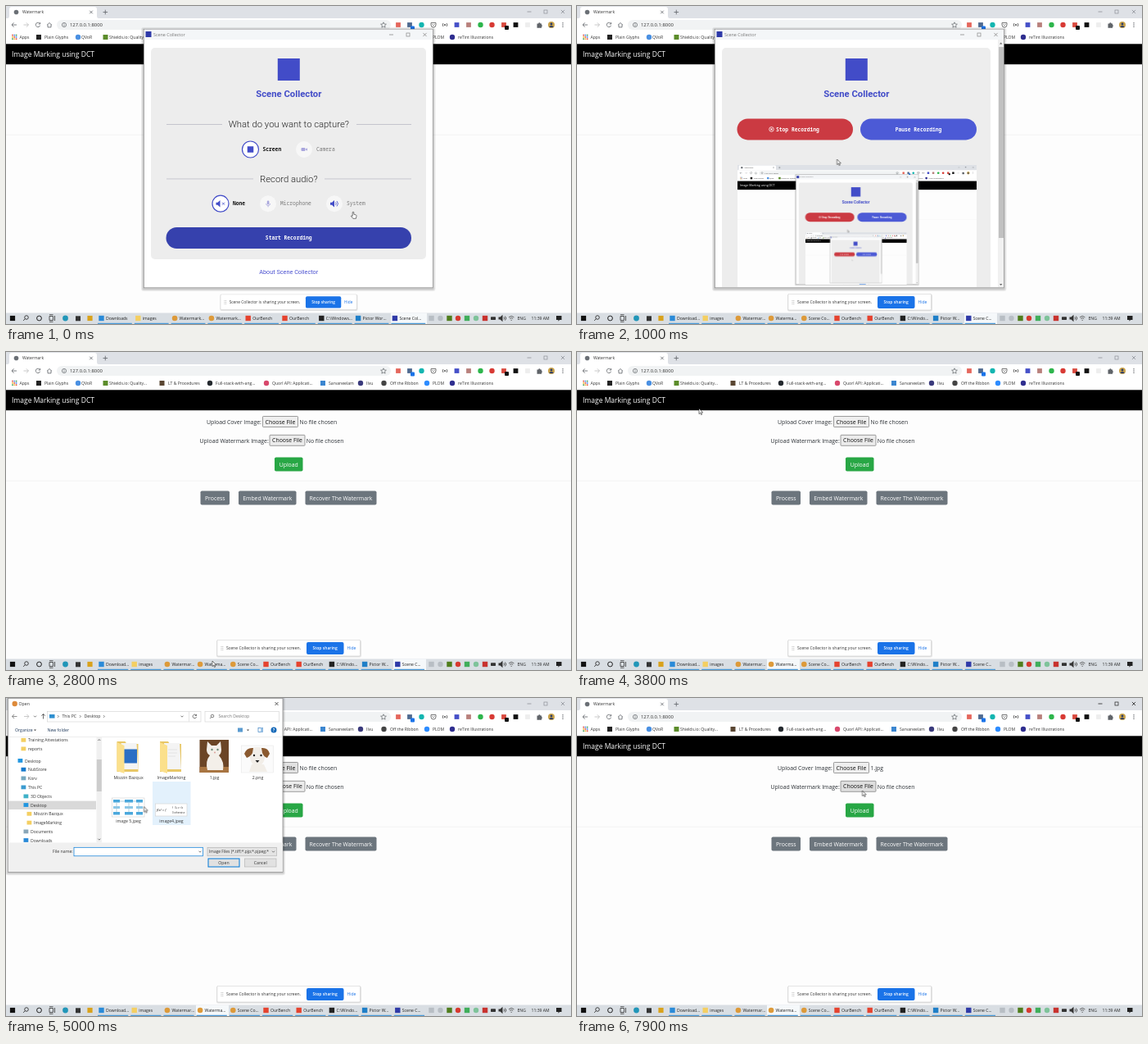
An HTML page for the animation above (8 s loop, 690 px wide and 388 px high).

```html
<!DOCTYPE html>
<html lang="en">
<head>
<meta charset="utf-8">
<title>Watermark</title>
<style>
html, body { margin: 0; width: 100%; height: 100%; overflow: hidden; background: #fdfdfd; }
body > svg { display: block; width: 690px; height: 388px; }
text { font-family: 'Open Sans', sans-serif; white-space: pre; }
.rb { font-family: Roboto, sans-serif; }
.mono { font-family: 'Noto Sans Mono', monospace; }
.mid { text-anchor: middle; }
.b { font-weight: 700; }

.setup, .rec, .bar1, .bar2, .active, .dialog, .closed, .picked, .named, .hand, .arrow,
.hover1, .hover2, .over4, .over1, .mark { animation: 8s step-end infinite; }
.setup { animation-name: setup; }
.rec { animation-name: rec; }
.bar1, .hand { animation-name: early; }
.bar2, .arrow { animation-name: late; }
.mark { animation-name: mark; }
.dialog { animation-name: dialog; }
.hover1 { animation-name: hover1; }
.hover2 { animation-name: hover2; }
.over4 { animation-name: over4; }
.over1 { animation-name: over1; }
.named { animation-name: named; }
.closed { animation-name: closed; }
.picked, .active { animation-name: picked; }
@keyframes setup { 0% { visibility: visible } 3.75%, 100% { visibility: hidden } }
@keyframes rec { 0% { visibility: hidden } 3.75%, 100% { visibility: visible } }
@keyframes early { 0% { visibility: visible } 4.375%, 100% { visibility: hidden } }
@keyframes late { 0% { visibility: hidden } 4.375%, 100% { visibility: visible } }
@keyframes mark { 0% { transform: translateX(272px) } 12.5% { transform: translateX(473px) } 36.25%, 100% { transform: translateX(232px) } }
@keyframes dialog { 0% { visibility: hidden } 52.5% { visibility: visible } 81.25%, 100% { visibility: hidden } }
@keyframes hover1 { 0% { fill: #efefef } 50% { fill: #e2e2e2 } 81.25%, 100% { fill: #efefef } }
@keyframes hover2 { 0% { fill: #ececec } 97.5%, 100% { fill: #dedede } }
@keyframes over4 { 0% { visibility: hidden } 60% { visibility: visible } 63.75%, 100% { visibility: hidden } }
@keyframes over1 { 0% { visibility: hidden } 70% { visibility: visible } 81.25%, 100% { visibility: hidden } }
@keyframes named { 0% { visibility: hidden } 73.75% { visibility: visible } 81.25%, 100% { visibility: hidden } }
@keyframes closed { 0% { visibility: visible } 81.25%, 100% { visibility: hidden } }
@keyframes picked { 0% { visibility: hidden } 81.25%, 100% { visibility: visible } }

.win { transform-origin: 493px 381px; animation: win 8s infinite; }
.stop { animation: stop 8s linear infinite; }
.pause { animation: pause 8s linear infinite; }
.view { animation: view 8s linear infinite; }
.share { transform-origin: 345px 361px; animation: share 8s infinite; }
.cur { animation: cur 8s ease-in-out infinite; }
@keyframes win { 0%, 16.25% { opacity: 1; transform: none } 18.75%, 100% { opacity: 0; transform: scale(.7) } }
@keyframes stop { 0%, 3.75% { opacity: 0; transform: translateY(-10px) } 7.25%, 100% { opacity: 1; transform: none } }
@keyframes pause { 0%, 5% { opacity: 0; transform: translateY(-10px) } 8.125%, 100% { opacity: 1; transform: none } }
@keyframes view { 0%, 3.75% { opacity: 0 } 8.75%, 100% { opacity: 1 } }
@keyframes share { 0%, 2% { transform: scale(.952) } 5%, 100% { transform: none } }
@keyframes cur {
  0%, 1.25% { transform: translate(424px, 251px) }
  3.75% { transform: translate(392px, 276px) }
  6.25%, 12.5% { transform: translate(317.5px, 187px) }
  16%, 23.75% { transform: translate(471.5px, 32px) }
  31.25%, 36.25% { transform: translate(252px, 377px) }
  42.5%, 45% { transform: translate(172px, 112px) }
  47.5% { transform: translate(149px, 69px) }
  51.25%, 56.25% { transform: translate(332px, 87px) }
  60.5% { transform: translate(206px, 124px) }
  62.5% { transform: translate(168.5px, 132.5px) }
  66.25%, 67.5% { transform: translate(166px, 132px) }
  73%, 77.5% { transform: translate(262px, 88.5px) }
  80.6%, 85% { transform: translate(268px, 199px) }
  95%, 100% { transform: translate(348.5px, 113px) }
}
/* the live preview runs a little late */
.view * { animation-delay: 80ms; animation-fill-mode: backwards; }
</style>
</head>
<body>
<script>
const BLUE = '#424cc8', INK = '#333', GREY = '#5f6368';
const R = (x, y, w, h, fill, more = '') => `<rect x="${x}" y="${y}" width="${w}" height="${h}" fill="${fill}" ${more}/>`;
const C = (x, y, r, fill, more = '') => `<circle cx="${x}" cy="${y}" r="${r}" fill="${fill}" ${more}/>`;
const P = (d, stroke = GREY, more = '') => `<path d="${d}" fill="none" stroke="${stroke}" stroke-width=".8" ${more}/>`;
const F = (d, fill, more = '') => `<path d="${d}" fill="${fill}" ${more}/>`;
const T = (x, y, s, size = 5.1, fill = INK, more = '') => `<text x="${x}" y="${y}" font-size="${size}" fill="${fill}" ${more}>${s}</text>`;
const G = (cls, ...parts) => `<g class="${cls}">${parts.join('')}</g>`;
const box = (x, y, s, fill) => R(x - s / 2, y - s / 2, s, s, fill);
const cross = (x, y, r, c) => P(`M${x - r} ${y - r}l${2 * r} ${2 * r}m0 ${-2 * r}l${-2 * r} ${2 * r}`, c);
const controls = (xs, y, c) => P(`M${xs[0] - 2.5} ${y}h5`, c) + R(xs[1] - 2, y - 2, 4, 4, 'none', `stroke="${c}" stroke-width=".7"`) + cross(xs[2], y, 2.1, c);
const search = (x, y, r, c) => C(x, y, r, 'none', `stroke="${c}" stroke-width=".8"`) + P(`M${x - r * .7} ${y + r * .7}l${-r} ${r}`, c);
const back = (x, y, c, dir = 1) => P(`M${x + 3 * dir} ${y}h${-6 * dir}m${2.6 * dir} -2.6l${-2.6 * dir} 2.6l${2.6 * dir} 2.6`, c);
const shadow = (x, y, w, h) => [1, 2, 3].map(d => R(x - d, y - d + 1, w + 2 * d, h + 2 * d, '#000', `opacity=".07" rx="${d}"`)).join('');

function browser() {
  const marks = [
    [40, 47, 'Plain Glyphs', '#222', 0], [88, 92, 'QVoR', '#4a90e2', 1],
    [121.5, 126, 'Shields.io: Quality...', '#5b8c2a', 0], [190.5, 198, 'LT &amp; Procedures', '#5a4632', 0],
    [249, 256, 'Full-stack-with-ang...', '#24292e', 1], [318, 325, 'Quorl API: Applicati...', '#d8486c', 1],
    [387, 394, 'Sarvaneelam', '#3b86d0', 0], [433, 440, 'Ilvu', '#3a3a7c', 1],
    [461.5, 469, 'Off the Ribbon', '#444', 1], [514, 521, 'PLOM', '#2d8cff', 1],
    [545, 552, 'reTint Illustrations', '#2f2e8f', 1]];
  const tools = [[479, '#e5675c', 0], [493, '#4f6a90', 0], [507.5, '#12b5b0', 1], [550.5, '#4650c8', 0],
    [565, '#b8807c', 0], [579.5, '#2db54b', 1], [593.5, '#d83a34', 1], [608, '#d94a3f', 0], [622.5, '#111', 0], [637, '#eee', 0]];
  return R(0, 0, 690, 15, '#dee1e6') +
    F('M2 15q2 0 2-3v-8q0-3 3-3h101q3 0 3 3v8q0 3 2 3z', '#fff') +
    C(12.5, 7.5, 2.8, '#6b7076') + T(20, 9.4, 'Watermark', 5) + cross(104, 7.5, 1.8, GREY) +
    P('M118.500 7.500h5.600m-2.800-2.800v5.600', GREY) +
    G('closed', controls([639, 659, 680], 7, '#8d9197')) + G('active', controls([639, 659, 680], 7, '#222')) +
    R(0, 15, 690, 31.500, '#fff') + R(62, 17, 408, 12, '#f1f3f4', 'rx="6"') +
    back(10, 23, GREY) + back(24.5, 23, '#bbb', -1) +
    P('M41.300 21.500a2.700 2.700 0 1 0 .3 2.200M41.700 20v2h-2', GREY) +
    P('M50 23.300l3-2.800l3 2.800M51 22.700v3.200h4v-3.200', GREY) +
    C(71, 23, 2.6, 'none', `stroke="${GREY}" stroke-width=".7"`) + P('M71 22.600v1.800M71 21.300v.6', GREY) +
    T(78, 25.1, '127.0.0.1:8000', 5.9) +
    F('M461 19.800l1 2.200 2.400.2-1.800 1.600.5 2.400-2.100-1.300-2.100 1.300.5-2.400-1.800-1.600 2.400-.2z', 'none', `stroke="${GREY}" stroke-width=".7"`) +
    tools.map(([x, c, round]) => round ? C(x, 23, 3.2, c) : box(x, 23, 5.8, c)).join('') +
    R(494, 24.5, 5, 5, '#1a73e8', 'rx="1"') + R(609, 24, 5, 5, '#111', 'rx="1"') +
    P('M519 20.500h6v2.500a3 3 0 0 1-6 0zM520.500 22.300l1.500 1.500 1.500-1.500', '#555') +
    C(536, 23, 1, '#444') + P('M534 21a3 3 0 0 0 0 4M538 21a3 3 0 0 1 0 4', '#444') +
    F('M648.500 21.500h1.700a1.200 1.200 0 0 1 2.400 0h1.500v1.600a1.200 1.200 0 0 1 0 2.200v1.400h-5.600z', GREY) +
    C(666, 23, 4, '#c9a24a') + C(666, 22, 1.4, '#2c3c66') + F('M663.300 26a2.800 2.800 0 0 1 5.400 0z', '#2c3c66') +
    [20.7, 23, 25.3].map(y => C(680, y, .7, GREY)).join('') +
    [0, 1, 2, 3, 4, 5, 6, 7, 8].map(i => box(8 + i % 3 * 2.3, 35.6 + (i / 3 | 0) * 2.3, 1.6, ['#e2493c', '#f0b428', '#3c9a55', '#4285f4'][i * 3 % 4])).join('') +
    T(16.5, 39.8, 'Apps') +
    marks.map(([x, tx, s, c, round]) => (round ? C(x, 38, 3.2, c) : box(x, 38, 6, c)) + T(tx, 39.8, s)).join('');
}

function site() {
  const btn = (x, y, w, s, c) => R(x, y, w, 17, c, 'rx="1.8"') + T(x + w / 2, y + 11.2, s, 6.9, '#fff', 'class="mid"');
  const pick = (x, y, cls) => R(x, y, 43, 13, '#efefef', `class="${cls}" stroke="#767676" stroke-width=".7" rx=".8"`) +
    T(x + 21.5, y + 9.1, 'Choose File', 6.9, '#111', 'class="mid"');
  return R(0, 46, 690, 342, '#fdfdfd') + R(0, 46.3, 690, 24.9, '#000') + T(7, 62, 'Image Marking using DCT', 8.5, '#fff') +
    T(245, 87.7, 'Upload Cover Image:', 6.9, '#2b3035') + pick(313.5, 78.5, 'hover1') +
    G('closed', T(358.5, 87.7, 'No file chosen', 6.9, '#2b3035')) + G('picked', T(358.5, 87.7, '1.jpg', 6.9, '#2b3035')) +
    T(236.5, 110.5, 'Upload Watermark Image:', 6.9, '#2b3035') + pick(322, 101.3, 'hover2') + T(366.7, 110.5, 'No file chosen', 6.9, '#2b3035') +
    btn(328, 128.5, 34.5, 'Upload', '#28a745') + R(0, 156.8, 690, .6, '#e9e9e9') +
    btn(237.5, 169.5, 35.5, 'Process', '#6c757d') + btn(284, 169.5, 70.5, 'Embed Watermark', '#6c757d') +
    btn(365.5, 169.5, 87, 'Recover The Watermark', '#6c757d');
}

const speaker = (x, y, c, tail) => F(`M${x - 4.5} ${y - 1.5}h2l3-2.700v8.400l-3-2.700h-2z`, c) + P(tail, c);

function setup() {
  const title = (y, s, a, b) => R(196, y, a - 196, .7, '#b4b4c0') + R(b, y, 495 - b, .7, '#b4b4c0') +
    T(345.3, y + 4, s, 11.3, '#222', 'class="rb mid" font-weight="300"');
  const opt = (x, y, s, on) => C(x, y, 10, on ? '#fff' : '#f7f7f7', on ? `stroke="${BLUE}" stroke-width="1.2"` : '') +
    T(x + 15, y + 2, s, 6.3, on ? '#111' : '#777', `class="mono${on ? ' b' : ''}"`);
  return G('setup', R(177, 51, 336, 258, '#ededed', 'rx="5"'), box(345.3, 77.5, 27, BLUE),
    T(345.3, 111.3, 'Scene Collector', 11.3, BLUE, 'class="rb b mid"'),
    title(144, 'What do you want to capture?', 264, 428), title(210.6, 'Record audio?', 302, 389),
    opt(298.5, 175, 'Screen', 1), box(298.5, 175, 7.5, BLUE),
    opt(364, 175, 'Camera'), R(360.5, 173, 5, 4, '#a9a6dd', 'rx="1"'), F('M365.500 175l2.500-1.800v3.600z', '#a9a6dd'),
    opt(262, 241.2, 'None', 1), speaker(261, 241.2, BLUE, 'M264 239.700l3 3m0-3l-3 3'),
    opt(320, 241.2, 'Microphone'), R(318.8, 237.5, 2.6, 4.8, '#a9a6dd', 'rx="1.3"'), P('M317.600 241a2.500 2.500 0 0 0 5 0M320.100 243.500v1.800', '#a9a6dd'),
    opt(401, 241.2, 'System'), speaker(400.5, 241.2, BLUE, 'M402.500 239.500q1.500 1.700 0 3.400M404 238q3 3.200 0 6.400'),
    R(195.5, 270, 299.5, 26, '#3641ad', 'rx="13"'), T(345.2, 285.2, 'Start Recording', 6.3, '#fff', 'class="mono b mid"'),
    T(345.2, 326.5, 'About Scene Collector', 7.3, '#4a50d0', 'class="rb mid"'));
}

function recording(depth) {
  return G('rec', '<svg x="169" y="41" width="345" height="302" viewBox="169 41 345 302">',
    R(177, 51, 328, 300, '#ededed', 'rx="5"'), box(341.3, 77.5, 27, BLUE),
    T(341.3, 111.3, 'Scene Collector', 11.3, BLUE, 'class="rb b mid"'),
    G('stop', R(195.5, 137.4, 141.5, 26, '#cb3a42', 'rx="13"'), C(237.5, 150.4, 2.8, 'none', 'stroke="#fff" stroke-width=".8"'), box(237.5, 150.4, 2, '#fff'),
      T(243, 152.6, 'Stop Recording', 6.3, '#fff', 'class="mono b"')),
    G('pause', R(346, 137.4, 142, 26, '#4c5ad6', 'rx="13"'), T(417, 152.6, 'Pause Recording', 6.3, '#fff', 'class="mono b mid"')),
    depth ? G('view', `<svg x="196" y="194" width="292" height="164.2" viewBox="0 0 690 388">${desktop(depth - 1)}</svg>`) : '',
    '</svg>', R(514, 41, 7, 302, '#f1f1f1'), R(515, 50, 6, 233, '#c1c1c1'),
    F('M516 46.500l1.700-2l1.700 2zM516 339l1.700 2l1.700-2z', '#666'));
}

const recorder = depth => G('win', shadow(168, 28, 353.5, 316),
  R(168.3, 28.3, 353, 315.5, '#fff', 'stroke="#8a8a8a" stroke-width=".7"'), R(168.7, 28.7, 352.2, 12.3, '#f4f6f8'), box(174, 34.5, 7, '#2f3aa8'),
  T(180, 36.5, 'Scene Collector', 5.4, '#777'), controls([470.5, 491, 511.5], 35, '#888'), setup(), recording(depth));

function sharing() {
  return G('share', R(257, 351.5, 177, 21, '#000', 'opacity=".1" rx="2"'),
    R(257.8, 351.3, 174.8, 19.7, '#fff', 'stroke="#ccc" stroke-width=".6" rx="1.5"'),
    P('M263 359v5M264.800 359v5', '#aaa', 'stroke-dasharray="1 1"'),
    T(269, 363.2, 'Scene Collector is sharing your screen.', 5.1), R(367, 354, 45.5, 15, '#1a73e8', 'rx="2"'),
    T(389.7, 363.2, 'Stop sharing', 5, '#fff', 'class="mid" font-weight="600"'), T(416.5, 363.2, 'Hide', 5, '#1a73e8'));
}

function taskbar() {
  const items = (list, step) => list.map(([s, c, round], i) => {
    const x = 113 + i * step;
    return (round ? C(x + 3.5, 381, 3.3, c) : box(x + 3.5, 381, 6.4, c)) + T(x + 9, 383, s, 5.1, '#222') + R(x - 1, 386.8, step - 3, 1.2, '#4a9ad8');
  }).join('');
  const chrome = '#dd9a3a', red = '#e5432f', dl = '#2a8ad8', yel = '#f4cf62', code = '#1f7fc8';
  const tray = [[519.5, '#b8bec4', 0], [530.5, '#b8bec4', 1], [541.5, '#4f7d1c', 0], [552, '#d6392f', 1], [563, '#3fae5a', 0], [574, '#7ec39a', 1], [585, '#c8322e', 0]];
  return R(0, 374.5, 690, 13.5, '#d9dee3') + box(8, 381, 6.2, '#111') + search(25, 380, 2.3, '#222') +
    C(40.5, 381, 2.9, 'none', 'stroke="#222" stroke-width="1"') +
    P('M53 378.500h4.500v5h-4.500zM59.500 378v6M53 376.700h4.500M53 385.300h4.500', '#333') +
    C(72.5, 381, 3.4, '#2196b8') + box(88, 381.3, 6, '#333') + box(102.5, 381, 6.2, '#d9a21c') +
    G('bar1', R(470, 374.5, 44, 13.5, '#f5f8fa'),
      items([['Downloads', dl], ['images', yel], ['Watermark...', chrome, 1], ['Watermark...', chrome, 1], ['OurBench', red], ['OurBench', red],
        ['C:\\Windows...', '#222'], ['Pictor Wor...', code], ['Scene Col...', '#2f3aa8']], 44.8)) +
    G('bar2', G('mark', R(0, 374.5, 40, 13.5, '#f5f8fa')),
      items([['Download...', dl], ['images', yel], ['Watermar...', chrome, 1], ['Waterma...', chrome, 1], ['Scene Co...', chrome, 1], ['OurBench', red],
        ['OurBench', red], ['C:\\Windo...', '#222'], ['Pictor W...', code], ['Scene C...', '#2f3aa8']], 40.2)) +
    tray.map(([x, c, round]) => round ? C(x, 381, 3.2, c) : box(x, 381, 6.4, c)).join('') +
    R(592, 379.3, 6, 3.6, '#333', 'rx=".6"') + speaker(606, 381, '#333', 'M608 379.500q1.500 1.500 0 3M609.500 378.500q2.500 2.500 0 5') +
    P('M614 379.800q3.200-3 6.400 0M615.200 381.500q2-2 4 0M616.500 383.300h1.400', '#444') +
    T(624.5, 383, 'ENG', 5.1, '#222') + T(641.5, 383, '11:39 AM', 5.1, '#222') + F('M672 378h6.500v5h-2.500l-1.500 1.800v-1.800h-2.500z', '#222');
}

function folder(x, y, label, mark) {
  return F(`M${x - 14} ${y}h10l2 3h14v34h-26z`, '#e8c766') + F(`M${x - 9} ${y + 2}h19l2 32h-19z`, '#f4f4f4') +
    (mark ? box(x + 2, y + 18, 17, '#2b6fc4') : P(`M${x - 4} ${y + 10}h11m-11 4h11m-11 4h9`, '#ddd')) +
    F(`M${x - 14} ${y + 1}l9 4v34l-9-3z`, '#fbe08c') + T(x, 99, label, 5.2, INK, 'class="mid"');
}

function dialog() {
  const tree = [[27, 53.4, 'Training Attestations', '#f4cf62'], [27, 64, 'reports', '#f4cf62'], [23, 78.5, 'Desktop', '#2196e0'],
    [27, 89.3, 'NubStore', '#1479cc'], [27, 100, 'Korv', '#77a9c0'], [27, 111, 'This PC', '#3b9bd0'], [30, 122, '3D Objects', '#3fb1c8'],
    [30, 132.6, 'Desktop', '#2196e0'], [34, 143.4, 'Mozzin Bazqux', '#f4cf62'], [34, 154.2, 'ImageMarking', '#f4cf62'],
    [30, 165, 'Documents', '#8aa7b8'], [30, 175.6, 'Downloads', '#2a8ad8']];
  const chev = (x, y) => P(`M${x} ${y - 1.3}l1.300 1.300l-1.300 1.300`, '#555');
  const down = (x, y) => P(`M${x - 1.5} ${y - .8}l1.500 1.500l1.500-1.500`, '#555');
  const line = 'stroke="#d0d0d0" stroke-width=".6"';
  const flow = [[0, 8], [14, 10], [28, 8]].map(([x, w]) => R(131 + x, 124, w, 3.5, '#4aa8dc') + R(131 + x, 132, w, 3, '#8cc8e8') + R(131 + x, 139, w, 3.5, '#4aa8dc')).join('');
  return G('dialog', shadow(2.5, .3, 335.5, 212), R(2.5, .3, 335.5, 212, '#fff', 'stroke="#888" stroke-width=".7"'),
    C(10.7, 7, 3.2, '#dd8a3a'), T(15.5, 9, 'Open', 5.2), cross(330.5, 7, 2, '#333'),
    back(10.5, 22.5, '#777'), back(25, 22.5, '#bbb', -1), down(35.5, 22.5), P('M45.500 25.500v-6m-2.200 2.200l2.200-2.200l2.200 2.200', '#444'),
    R(50.5, 16.3, 187.5, 12.7, '#fff', line), R(53, 20, 6.5, 4.6, '#2f8fd0'), chev(63, 22.5), T(68.5, 24.4, 'This PC', 5.2), chev(90, 22.5),
    T(95.5, 24.4, 'Desktop', 5.2), chev(119, 22.5), down(215, 22.5), P('M223.500 16.500v12.300', '#ddd'),
    P('M232.400 21.200a2.300 2.300 0 1 0 .2 2M232.600 19.800v1.700h-1.700', '#555'),
    R(243, 16.3, 90.5, 12.7, '#fff', line), search(252, 22, 1.8, '#666'), T(259.5, 24.4, 'Search Desktop', 5.2, '#777'),
    T(11, 41.2, 'Organize', 5.2, '#1e395b'), F('M34 38.500h3l-1.500 1.800z', '#444'), T(50.5, 41.2, 'New folder', 5.2, '#1e395b'),
    R(283, 36.5, 6, 5, '#5b9bd0'), F('M294 38.500h3l-1.500 1.800z', '#444'), R(308, 36.5, 5.5, 5, 'none', 'stroke="#3b7fc0" stroke-width=".7"'), R(311, 36.5, 2.5, 5, '#9cc4e8'),
    C(327, 39, 3.5, '#1669b8'), T(327, 41, '?', 5.2, '#fff', 'class="mid b"'), R(3, 47, 334.5, .6, '#e2e2e2'),
    R(3, 125.6, 107, 10.4, '#d9d9d9'),
    tree.map(([x, y, s, c]) => R(x - 8.5, y - 4.5, 5.8, 4.8, c) + T(x, y, s, 5.1)).join(''),
    R(110.5, 47.5, 6.5, 129, '#f0f0f0'), R(110.8, 75, 6, 39, '#cdcdcd'), P('M112.300 52l1.500-1.500l1.500 1.500', '#555'), down(113.8, 172.5),
    G('over4', R(179, 102, 46.5, 53, '#e3f1fc')), G('over1', R(231.3, 49.3, 47, 52.5, '#cce8ff', 'stroke="#99d1ff" stroke-width=".6"')),
    folder(149.5, 53, 'Mozzin Bazqux', 1), folder(202, 53, 'ImageMarking'),
    R(236.500, 51, 35.500, 40, '#6b4526'), R(236.500, 84, 35.500, 7, '#a87542'),
    F('M246 53l5 5h6l5-5l1 10q0 5-3 7q7 8 5 18h-19q-3-11 3-18q-4-2-4-7z', '#f3efe9'), C(251.500, 63, 1.2, '#6d8a78'), C(258.500, 63, 1.2, '#6d8a78'), C(255, 66.500, .9, '#d99a92'),
    R(287.500, 58, 39, 33, '#fbfbfb', 'stroke="#e4e4e4" stroke-width=".5"'),
    F('M296 66q4-7 11-6q8-1 11 6l-3 11q-3 6-8 6q-5 0-8-6zM300 81h15l4 9h-22z', '#f2eee8'),
    F('M302 61q-8-1-11 7l3 5q5-2 7-6zM312 61q8-1 10 7l-3 5q-4-1-6-6z', '#8b5a30'), C(303, 70, 1.2, '#222'), C(311.500, 70, 1.2, '#222'), F('M304.500 76h5l-2.500 3z', '#222'),
    T(254.5, 99, '1.jpg', 5.2, INK, 'class="mid"'), T(307.5, 99, '2.png', 5.2, INK, 'class="mid"'),
    R(129.500, 122, 39.500, 23, '#fff', line), flow, P('M139 126h6m10 0h4M150 128v11M135 128v11M162 128v11', '#9cc4d8'),
    R(182.500, 129, 38.500, 15, '#fff', line), T(184, 138, 'f(x) = {', 4.2, '#222', 'font-style="italic"'), T(203, 135, 'f   0≤ x &lt; b', 2.8), T(203, 140.5, '0 otherwise', 2.8),
    T(149.5, 152, 'image 5.jpeg', 5.2, INK, 'class="mid"'), T(202, 152, 'image4.jpeg', 5.2, INK, 'class="mid"'),
    R(2.8, 176.5, 334.9, 35.5, '#f0f0f0'), T(57, 189.4, 'File name:', 5.2), R(83, 182.3, 157.500, 10.5, '#fff', 'stroke="#0078d7" stroke-width=".7"'), down(237, 187.5),
    G('named', T(85, 189.4, '1.jpg', 5.2)),
    R(246, 182.3, 84.500, 10.5, '#e4e4e4', 'stroke="#adadad" stroke-width=".6"'), T(248, 189.4, 'Image Files (*.tiff;*.pjp;*.pjpeg;*', 4.9), down(326.5, 187.5),
    R(247, 196, 38, 10, '#e1e1e1', 'stroke="#0078d7" stroke-width="1"'), T(266, 203, 'Open', 5.2, INK, 'class="mid"'),
    R(291.500, 196, 38.500, 10, '#e1e1e1', 'stroke="#adadad" stroke-width=".6"'), T(310.8, 203, 'Cancel', 5.2, INK, 'class="mid"'));
}

const pointer = () => G('cur',
  G('arrow', F('M0 0v6.600l1.500-1.400 1.100 2.400 1.100-.5-1.100-2.300h2.100z', '#fff', 'stroke="#222" stroke-width=".6"')),
  G('hand', F('M-.8 .6q.8-1 1.600 0v2.600l2.600.7q.7.4.6 1.400l-.6 3h-3.600l-2.400-3q0-1 1.800 0z', '#fff', 'stroke="#222" stroke-width=".6"')));

function desktop(depth, extra = '') {
  return browser() + site() + recorder(depth) + extra + sharing() + taskbar() + pointer();
}

document.body.innerHTML = `<svg viewBox="0 0 690 388">${desktop(2, dialog())}</svg>`;
</script>
</body>
</html>
```
